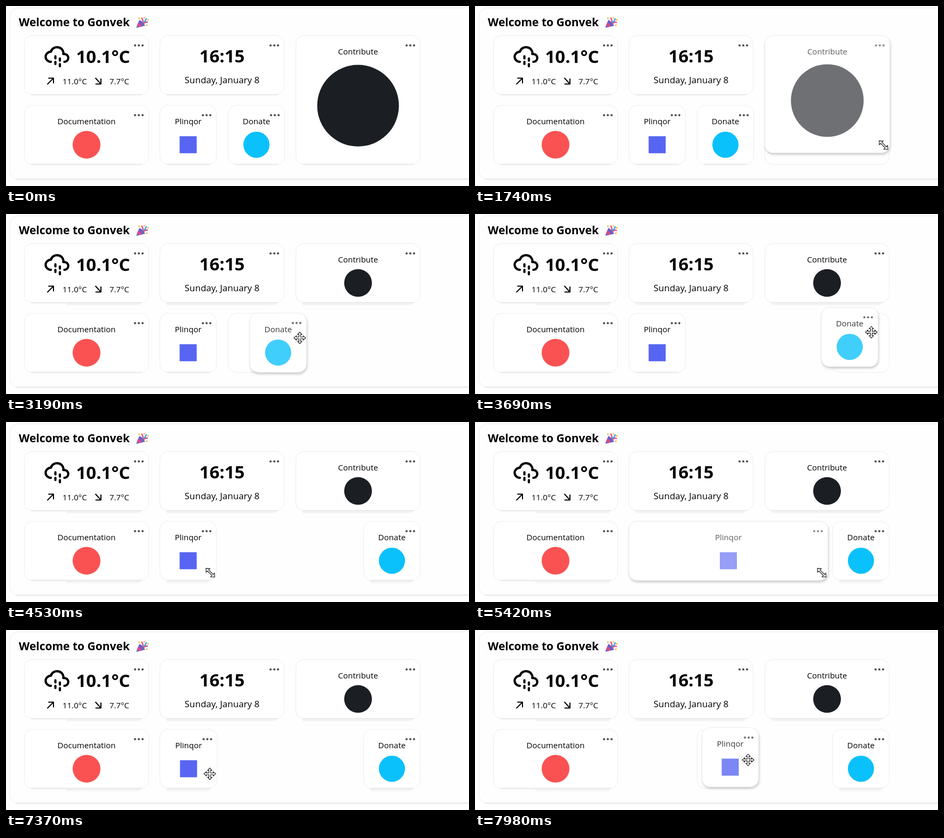
These frames come from a looping animation (868x338 px, 8000 ms). An HTML page:

```html
<!DOCTYPE html>
<html lang="en">
<head>
<meta charset="utf-8">
<title>Dashboard</title>
<style>
  html, body { margin: 0; width: 100%; height: 100%; overflow: hidden; background: #fff; }
  svg { display: block; width: 100%; height: 100%; }
  text { font: 15px "Open Sans", "Noto Sans", sans-serif; fill: #000; }
  .mid { text-anchor: middle; }
  .title { font-size: 21px; font-weight: 700; }
  .big { font-size: 33px; font-weight: 700; }
  .date { font-size: 17px; }
  .box { fill: #fff; stroke: #ededed; }
  .edge { stroke: #e7e7e7; stroke-width: 2; }
  .soft { stroke: #f4f4f4; stroke-width: 5; }
  .lifted { filter: drop-shadow(1px 3px 2px rgba(0, 0, 0, .2)); }
  .line { fill: none; stroke: #000; stroke-width: 2; stroke-linecap: round; stroke-linejoin: round; }
  .cursor { fill: #fff; stroke: #111; stroke-width: 1.1; }
</style>
</head>
<body>
<svg id="stage" viewBox="0 0 868 338"></svg>
<script>
const LOOP = 8000, FADE = 80, SETTLE = 200, TRAVEL = 450;
const LEFT = 288.4, TOP = 55, COL = 127.2, ROW = 131, GAP = 20;
const stage = document.getElementById('stage');

function set(node, attrs) {
  for (const k in attrs) node.setAttribute(k, attrs[k]);
}

function el(tag, attrs, parent = stage, text) {
  const node = document.createElementNS('http://www.w3.org/2000/svg', tag);
  set(node, attrs);
  if (text) node.textContent = text;
  parent.appendChild(node);
  return node;
}

const clamp = v => Math.max(0, Math.min(1, v));
const ease = v => { const p = clamp(v); return p * p * (3 - 2 * p); };
const mix = (a, b, p) => a.map((v, i) => v + (b[i] - v) * p);

// Grid cell [column, row, columns, rows] to pixel box and back
const toBox = ([c, r, cs, rs]) =>
  [LEFT + c * COL, TOP + r * ROW, cs * COL - GAP, rs * ROW - GAP + 1].map(Math.round);
const toCell = ([x, y, w, h]) =>
  [(x - LEFT) / COL, (y - TOP) / ROW, (w + GAP) / COL, (h + GAP) / ROW].map(Math.round);

// Panel, heading and party popper
el('rect', { x: 7.5, y: 3.5, width: 900, height: 322, rx: 16, fill: '#fefefe', stroke: '#ececec' });
el('path', { d: 'M20 325H868', class: 'edge' });
el('text', { x: 24, y: 38, class: 'title' }, stage, 'Welcome to Gonvek');

const popper = el('g', { transform: 'translate(244 20)', fill: 'none', 'stroke-width': 2.4 });
el('path', { d: 'M0 21L6 6Q14 10 17 17Z', fill: '#6a62c4' }, popper);
el('path', { d: 'M4 11L11 18L7 19L2 16Z', fill: '#f0437a' }, popper);
el('path', { d: 'M12 11Q14 6 10 2M14 13Q18 9 22 11', stroke: '#f0437a' }, popper);
el('path', { d: 'M13 11Q18 9 19 3', stroke: '#2fa4e7' }, popper);
el('path', { d: 'M5 3h.1M15 2h.1M22 6h.1M20 16h.1', stroke: '#f7b731', 'stroke-width': 3, 'stroke-linecap': 'round' }, popper);

const slot = el('rect', { class: 'box', rx: 15 });

function makeCard(cell, label, icon) {
  const soft = el('path', { class: 'soft' });
  const box = el('rect', { class: 'box', rx: 15 });
  const edge = el('path', { class: 'edge' });
  const body = el('g', {});
  const dots = el('g', { fill: '#4b4d50' }, body);
  for (const cx of [-7, 0, 7]) el('circle', { cx, cy: 0, r: 2.1 }, dots);
  const text = label && el('text', { class: 'mid', y: 36 }, body, label);
  const mark = icon && el('rect', { fill: icon.fill }, body);
  return { cell, soft, box, edge, body, dots, text, mark, icon };
}

const circle = (fill, r) => ({ fill, r, round: true });
const weather = makeCard([-2, 0, 2, 1]);
const clock = makeCard([0, 0, 2, 1]);
const docs = makeCard([-2, 1, 2, 1], 'Documentation', circle('#fa5252', 26));
const contribute = makeCard([2, 0, 2, 2], 'Contribute', circle('#1b1e22', 26));
const donate = makeCard([1, 1, 1, 1], 'Donate', circle('#0bc1fb', 24.5));
const chat = makeCard([0, 1, 1, 1], 'Plinqor', { fill: '#5865f2', r: 16 });
const cards = [weather, clock, docs, contribute, donate, chat];

// Weather and clock contents
el('path', {
  class: 'line', transform: 'translate(35.5 12) scale(2.1)',
  d: 'M7 18a4.6 4.4 0 0 1 0-9a5 4.5 0 0 1 11 2h1a3.5 3.5 0 0 1 0 7M11 13v2m0 3v2m4-5v2m0 3v2'
}, weather.body);
el('path', { class: 'line', d: 'M44 91.5L55 80.5M46 80.5H55V89.5M134 80.5L144 91.5M144 82V91.5H134.5' }, weather.body);
el('text', { x: 97.5, y: 52, class: 'big' }, weather.body, '10.1°C');
el('text', { x: 72, y: 92 }, weather.body, '11.0°C');
el('text', { x: 160, y: 92 }, weather.body, '7.7°C');
el('text', { x: 117, y: 51, class: 'mid big' }, clock.body, '16:15');
el('text', { x: 117, y: 90, class: 'mid date' }, clock.body, 'Sunday, January 8');

const cursors = {
  arrow: 'M0 0V16L4 12.5L6.5 18.5L9 17.5L6.5 11.5H11.5Z',
  resize: 'M-11.5 0L-6-5V-1.5H6V-5L11.5 0L6 5V1.5H-6V5Z',
  move: 'M0-11L4-6.5H1.6V-1.6H6.5V-4L11 0L6.5 4V1.6H1.6V6.5H4L0 11L-4 6.5H-1.6V1.6H-6.5V4L-11 0L-6.5-4V-1.6H-1.6V-6.5H-4Z'
};
const cursor = el('path', { class: 'cursor' });

// Each gesture pulls a card by (dx, dy), then drops it into a cell
const gestures = [
  { card: contribute, kind: 'resize', start: 1580, end: 2190, drop: 2370, dx: 5, dy: -126, to: [2, 0, 2, 1] },
  { card: donate, kind: 'move', start: 3010, end: 3690, drop: 4000, dx: 233, dy: -11, grip: [94, 47], to: [3, 1, 1, 1] },
  { card: chat, kind: 'resize', start: 4840, end: 5420, drop: 5600, dx: 267, dy: 0, to: [0, 1, 3, 1] },
  { card: chat, kind: 'resize', start: 6420, end: 7090, drop: 7270, dx: -252, dy: 0, to: [0, 1, 1, 1] },
  { card: chat, kind: 'move', start: 7520, end: 7980, drop: LOOP + FADE, dx: 137, dy: -3, grip: [87, 61], to: [1, 1, 1, 1] }
];

const isHeld = (g, t) => t >= g.start && t < g.drop;

function pull([x, y, w, h], g, t) {
  const p = ease((t - g.start) / (g.end - g.start));
  return g.kind === 'move'
    ? [x + g.dx * p, y + g.dy * p * p, w, h]
    : [x, y, w + g.dx * p, h + g.dy * p];
}

function boxAt(card, t) {
  let box = toBox(card.cell);
  for (const g of gestures) {
    if (g.card === card && t >= g.start)
      box = mix(pull(box, g, t), toBox(g.to), ease((t - g.drop) / SETTLE));
  }
  return box;
}

function alphaAt(card, t) {
  let alpha = 1;
  for (const g of gestures) {
    if (g.card !== card) continue;
    const faded = clamp(Math.min(t - g.start, g.drop + FADE - t) / FADE);
    alpha -= faded * (g.kind === 'move' ? .22 : .37);
  }
  return alpha;
}

function drawCard(c, t) {
  const [x, y, w, h] = boxAt(c, t), bottom = y + h;
  const lifted = gestures.some(g => g.card === c && isHeld(g, t));
  const settled = t > gestures[c.cell[1]].drop + SETTLE && !lifted;
  set(c.box, { x: x + .5, y: y + .5, width: w - 1, height: h - 1, class: lifted ? 'box lifted' : 'box' });
  set(c.edge, { d: `M${x + 13} ${bottom - .5}H${x + w - 13}`, opacity: lifted ? 0 : 1 });
  set(c.soft, { d: `M${Math.max(113, x + 13)} ${bottom + 2}H${x + w - 16}`, opacity: settled ? 1 : 0 });
  set(c.body, { transform: `translate(${x} ${y})`, opacity: alphaAt(c, t) });
  set(c.dots, { transform: `translate(${w - 19} 19)` });
  if (!c.mark) return;
  const extra = h - 112, r = c.icon.r + extra * .386;
  set(c.text, { x: w / 2 });
  set(c.mark, {
    x: w / 2 - r, y: 74.5 + extra * .44 - r,
    width: 2 * r, height: 2 * r, rx: c.icon.round ? r : 0
  });
}

function drawSlot(t) {
  const g = gestures.find(g => isHeld(g, t));
  set(slot, { opacity: g ? 1 : 0 });
  if (!g) return;
  const [x, y, w, h] = toBox(toCell(boxAt(g.card, t)));
  set(slot, { x: x + .5, y: y + .5, width: w - 1, height: h - 1 });
}

function gripAt(g, t) {
  const [x, y, w, h] = boxAt(g.card, t);
  const [dx, dy] = g.grip || [w - 12, h - 15];
  return [x + dx, y + dy];
}

function drawCursor(t) {
  const i = gestures.findIndex(g => t < g.drop), g = gestures[i], last = gestures[i - 1];
  let kind = g.kind, pos = gripAt(g, t);
  if (t < g.start) {
    const leave = last ? last.drop : 1030;
    const from = last ? gripAt(last, leave - 1) : [744, 346];
    const p = ease((t - leave) / Math.min(TRAVEL, g.start - leave));
    pos = mix(from, gripAt(g, g.start), p);
    if (p < .9 && !last) kind = 'arrow';
  }
  set(cursor, {
    d: cursors[kind],
    transform: `translate(${pos}) rotate(${kind === 'resize' ? 45 : 0})`
  });
}

function render(t) {
  for (const c of cards) drawCard(c, t);
  drawSlot(t);
  drawCursor(t);
}

const start = performance.now();
function tick() {
  render((performance.now() - start) % LOOP);
  requestAnimationFrame(tick);
}
tick();
</script>
</body>
</html>
```
